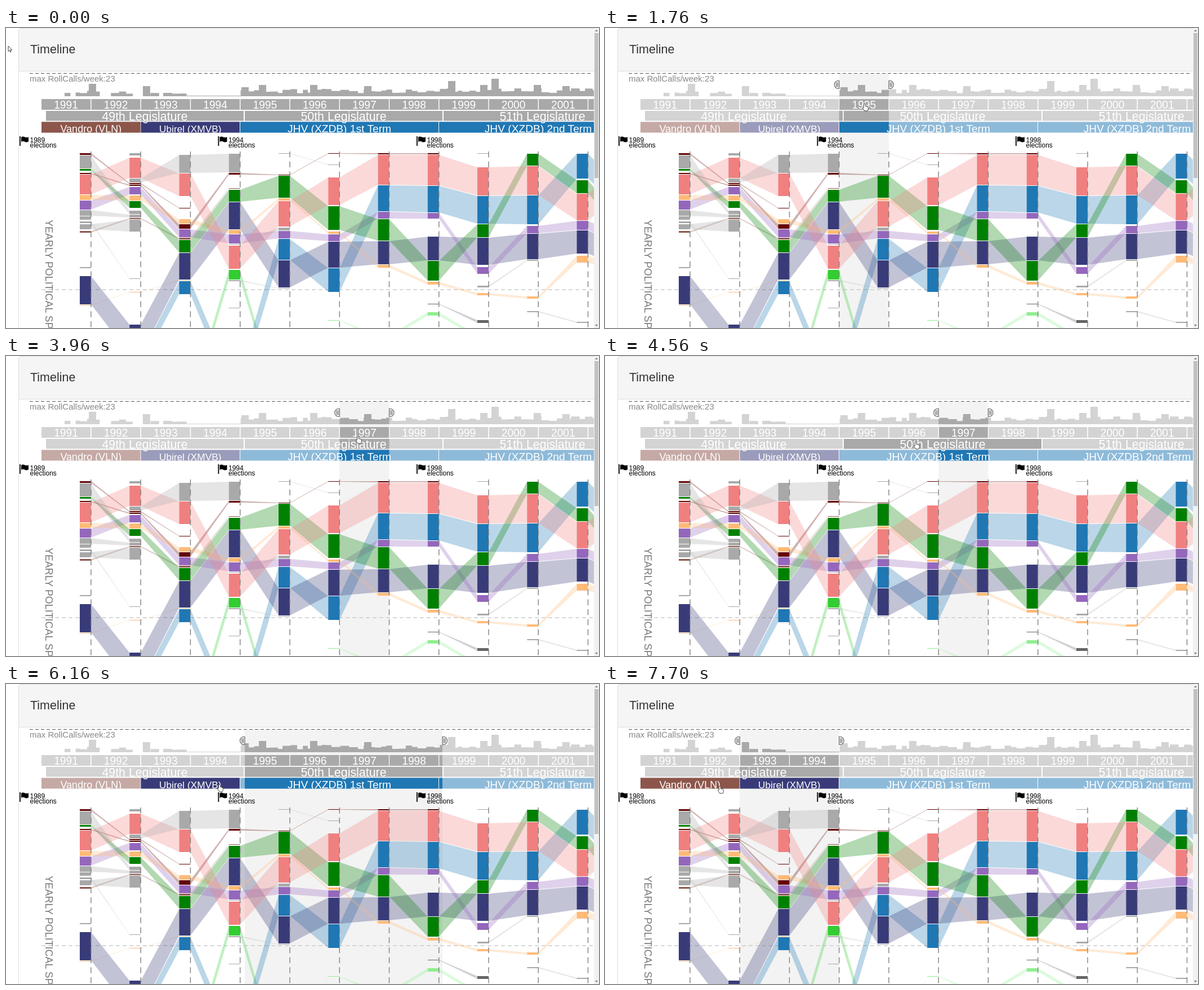
Write an HTML page that moves like this. It is 1053 by 532 pixels and loops after 8000 ms.

```html
<!DOCTYPE html>
<html lang="en">
<head>
<meta charset="utf-8">
<title>Timeline</title>
<style>
  html, body { margin: 0; width: 100%; height: 100%; overflow: hidden; background: #fff; }
  svg { display: block; width: 1053px; height: 532px; font-family: "Liberation Sans", Arial, sans-serif; }
</style>
</head>
<body>
<svg id="stage" viewBox="0 0 1053 532">
  <defs>
    <clipPath id="panel"><rect x="22" width="1022" height="532"/></clipPath>
    <clipPath id="rows"><path d="M63 126H1044V145H63ZM63 147H1044V164.5H63ZM63 166.5H1044V185.5H63Z"/></clipPath>
    <clipPath id="brushClip"><rect id="window" y="80" height="110"/></clipPath>
  </defs>
</svg>
<script>
const LOOP = 8000;
const GRAY = '#a9a9a9', NAVY = '#393b79', BLUE = '#1f77b4', BROWN = '#8c564b';
const WINE = '#640000', ORANGE = '#ffbb78';

const stage = document.getElementById('stage');
const edge = i => 151 + 88.25 * i;

function set(node, attrs) {
  for (const k in attrs) node.setAttribute(k, attrs[k]);
}
function add(parent, tag, attrs, text) {
  const node = document.createElementNS('http://www.w3.org/2000/svg', tag);
  set(node, attrs);
  if (text) node.textContent = text;
  parent.append(node);
  return node;
}
const group = (parent, attrs = {}) => add(parent, 'g', attrs);
const rect = (parent, x, y, width, height, fill) => add(parent, 'rect', { x, y, width, height, fill });
const path = (parent, d, attrs) => add(parent, 'path', { d, ...attrs });
const label = (parent, x, y, size, fill, text, attrs = {}) =>
  add(parent, 'text', { x, y, 'font-size': size, fill, ...attrs }, text);

let seed = 23;
const random = () => (seed = (seed * 16807) % 2147483647) / 2147483647;

// Panel frame
path(stage, 'M22.5 532V6Q22.5 .5 28 .5H1044V76H22.5Z', { fill: '#f5f5f5' });
path(stage, 'M22.5 532V6Q22.5 .5 28 .5H1044M22 76.5H1044', { fill: 'none', stroke: '#ddd' });
rect(stage, 23, 77, 1021, 455, '#fff');
label(stage, 43, 45, 21.5, '#333', 'Timeline');

const chart = group(stage, { 'clip-path': 'url(#panel)' });
const band = rect(chart, 0, 81, 0, 451, '#f3f3f3');
path(chart, 'M42 80.5H1041', { stroke: '#555', 'stroke-dasharray': '6 4' });
label(chart, 42, 95, 15, '#888', 'max RollCalls/week:23');

// Weekly histogram: sparse until 1995, then steady, with a few busy spells
const block = (x, w, h) => `M${x} 121v${-h}h${w}v${h}z`;
function weeklyHistogram() {
  let d = '';
  for (let x = 97; x < 1044;) {
    const w = 7 + 9 * random(), r = random();
    const h = x > 416 ? 5 + 9 * r : x > 312 ? 1 : r < .35 ? 0 : 1 + 9 * r;
    d += block(x, w, h);
    x += w;
  }
  const peaks = [[147, 22], [243, 18], [418, 16], [449, 20], [540, 20], [636, 18],
    [785, 27], [842, 20], [862, 31], [937, 20], [988, 18]];
  return d + peaks.map(([x, h]) => block(x, 13, h)).join('');
}
const histogram = weeklyHistogram();

// Three rows of periods
const boxes = [];
const captions = group(stage, { 'clip-path': 'url(#rows)' });
function period(x0, x1, y, h, fill, text, size, base) {
  boxes.push({ x: x0, y, w: x1 - x0, h, fill });
  label(captions, (x0 + x1) / 2, base, size, '#fff', text, { 'text-anchor': 'middle' });
}
for (let i = 0; i < 12; i++)
  period(i ? edge(i - 1) + .8 : 63, edge(i) - .8, 126, 19, GRAY, String(1991 + i), 19.3, 143);
for (let i = 0; i < 3; i++)
  period(71 + 353 * i, 422 + 353 * i, 147, 17.5, GRAY, `${49 + i}th Legislature`, 21.4, 164);
const term = (x0, x1, fill, text, size) => period(x0, x1, 166.5, 19, fill, text, size, 185);
term(63, 238.6, BROWN, 'Vandro (VLN)', 18);
term(239.6, 415, NAVY, 'Ubirel (XMVB)', 17.3);
term(416, 768, BLUE, 'JHV (XZDB) 1st Term', 19.2);
term(769, 1121, BLUE, 'JHV (XZDB) 2nd Term', 19.2);

function overview(attrs) {
  const g = group(chart, attrs);
  path(g, histogram, { fill: GRAY });
  boxes.forEach(b => rect(g, b.x, b.y, b.w, b.h, b.fill));
}
overview({ opacity: .5 });
overview({ 'clip-path': 'url(#brushClip)' });
const hoverBox = rect(chart, 0, 0, 0, 0, GRAY);

// Election flags
[1989, 1994, 1998].forEach((year, i) => {
  const g = group(chart, { transform: `translate(${24 + 352.5 * i} 192)` });
  path(g, 'M.9 0V17', { stroke: '#000', 'stroke-width': 1.8 });
  path(g, 'M3 1.5Q6-.5 9 1.2T16 1.2V9.5Q12 11.5 9 9.6T3 10Z', { fill: '#000' });
  label(g, 18.5, 11, 12, '#000', String(year));
  label(g, 18.5, 20, 12, '#000', 'elections');
});

path(chart, 'M63 464H1044', { stroke: '#ccc', 'stroke-width': 1.3, 'stroke-dasharray': '7 5' });
label(chart, 0, 0, 17.9, '#777', 'YEARLY POLITICAL SPECTRUM', { transform: 'translate(70 340) rotate(90)' });

// Parties in paint order; lower-case letters are small parties, drawn gray
const parties = {
  L: '#32cd32', M: '#90ee90', R: BROWN, W: WINE, V: WINE, B: BLUE, T: ORANGE, N: NAVY,
  P: '#9467bd', O: ORANGE, G: '#008000', S: '#f08080', m: '#666',
};
// One stack per year from the top down: party letter and height, or "+" and a gap
const years = [
  'W3 a23 G3 +3 V2 S35 O9 P16 b10 c6 +2 d3 +1 e9 +2 R3 +60 f2 +13 N50 T1',
  'h4 +3 S36 g7 W2 V2 +1 P13 +1 O9 G12 +4 a6 b5 R2 e21 +82 d1 +22 T1 +56 N53 B20',
  '+3 g32 S40 +20 W1 +18 O8 V8 P14 R3 G22 N47 T1 B23 +187 L16',
  '+1 g33 V3 +23 R1 +1 G21 N48 O7 P16 i1 +1 S41 +1 L17 j2 +46 k1 +112 B30',
  'l1 +36 V1 G39 O4 S45 +1 i5 P13 B37 N48 j1 +197 L12 M8',
  'V1 +18 l1 +21 S49 +1 G42 +2 O4 P12 N46 B42 +49 M1',
  'V2 S53 B46 P12 G38 N41 O5 +119 M6',
  'V2 S54 B47 P10 +31 N42 G35 +1 O5 +33 m1 +13 M6',
  'n1 +23 S50 B49 G23 N48 +3 P12 +20 o3 +9 O4 +43 m5 +20 M6',
  '+1 G21 S51 B51 +2 P13 N45 o2 +62 O4 +21 p2',
  '+1 B44 +2 G23 S47 P16 N41 +3 O12 +104 p2',
  '+8 S60 B40 +20 G20 P14 N40 O8',
];
function stack(text) {
  const spans = {};
  let y = 222;
  for (const part of text.split(' ')) {
    const size = Number(part.slice(1));
    if (part[0] === '+') { y += size; continue; }
    spans[part[0]] = [y, y + size];
    y += size + 1;
  }
  return spans;
}
const stacks = years.map(stack);
const ribbons = group(chart), bars = group(chart);
const order = new Set([...Object.keys(parties), ...'abcdefghijklnop']);
for (const key of order) {
  const fill = parties[key] || GRAY;
  stacks.forEach((spans, i) => {
    if (!spans[key]) return;
    const [top, bottom] = spans[key], x = edge(i);
    rect(bars, x - 20, top, 20, bottom - top, fill);
    const next = stacks[i + 1] && stacks[i + 1][key];
    if (next)
      path(ribbons, `M${x} ${top}L${edge(i + 1) - 20} ${next[0]}V${next[1]}L${x} ${bottom}Z`, { fill, opacity: .3 });
  });
}

for (let i = 0; i < 11; i++)
  path(chart, `M${edge(i)} 219V532`, { stroke: '#808080', 'stroke-width': 1.4, 'stroke-dasharray': '10.5 7.2' });

// Captions sit above the coloured boxes
stage.append(captions);

// Brush handles
function grip() {
  const g = group(stage);
  path(g, 'M0-7H-2A6.5 7 0 0 0-2 7H0Z', { fill: '#eee', stroke: '#666', 'stroke-width': 1.2 });
  path(g, 'M-2.6-4V4M-5-4V4', { stroke: '#666', 'stroke-width': 1.1 });
  return g;
}
const gripLeft = grip(), gripRight = grip();

// Page scrollbar
rect(stage, 1044, 0, 9, 532, '#f1f1f1');
rect(stage, 1045, 9, 7, 257, '#c1c1c1');
path(stage, 'M1046 6L1048.5 3L1051 6ZM1046 526L1048.5 529L1051 526Z', { fill: '#777' });

// Pointer
const ink = { fill: '#fff', stroke: '#333', 'stroke-width': .9 };
const arrow = path(stage, 'M0 0V9.5L2.3 7.4L3.8 10.8L5.2 10.2L3.7 6.8H6.7Z', ink);
const hand = path(stage,
  'M-1.5 7V.8Q0-1 1.3 .8V4.5L5 5.4Q6.3 5.8 6.3 7.2V9.5Q6.3 11.5 5 13H0L-3.4 8.2Q-3.2 6.2-1.5 7Z', ink);

// Each move: start, end, number of steps, points passed
const moves = [
  [500, 500, 1, [[4, 32], [294, 39]]],
  [900, 1430, 8, [[294, 39], [350, 62], [461, 134]]],
  [1830, 1900, 2, [[461, 134], [470, 136]]],
  [2160, 2500, 6, [[470, 136], [505, 144], [543, 137]]],
  [3180, 3500, 5, [[543, 137], [625, 142]]],
  [4160, 4560, 7, [[625, 142], [590, 151], [552, 152]]],
  [5700, 6160, 8, [[552, 152], [398, 158], [379, 178]]],
  [7230, 7700, 8, [[379, 178], [204, 181]]],
];
const brushes = [
  [1760, edge(3), edge(4)], [3100, edge(4), edge(5)], [3960, edge(5), edge(6)],
  [5230, 424, 775], [7160, edge(1), edge(3)],
];
const latest = (list, t) => list.filter(item => t >= item[0]).pop();

function along(points, p) {
  const s = p * (points.length - 1), i = Math.min(Math.floor(s), points.length - 2);
  return points[i].map((v, k) => v + (points[i + 1][k] - v) * (s - i));
}
function pointerAt(t) {
  const move = latest(moves, t);
  if (!move) return [4, 32];
  const [t0, t1, n, points] = move;
  const step = t >= t1 ? n : Math.floor((t - t0) / (t1 - t0) * (n - 1)) + 1;
  return along(points, step / n);
}
const show = (node, on) => { node.style.display = on ? '' : 'none'; };

function draw(t) {
  const [x, y] = pointerAt(t);
  const over = boxes.find(b => x >= b.x && x <= b.x + b.w && y >= b.y && y <= b.y + b.h);
  const brush = latest(brushes, t);
  const [, x0, x1] = brush || [0, 0, 1053];

  set(document.getElementById('window'), { x: x0, width: x1 - x0 });
  set(band, { x: x0, width: x1 - x0 });
  set(gripLeft, { transform: `translate(${x0} 100.5)` });
  set(gripRight, { transform: `translate(${x1} 100.5) scale(-1 1)` });
  [band, gripLeft, gripRight].forEach(node => show(node, brush));

  if (over) set(hoverBox, { x: over.x, y: over.y, width: over.w, height: over.h, fill: over.fill });
  show(hoverBox, over);

  for (const node of [arrow, hand]) set(node, { transform: `translate(${x} ${y})` });
  show(arrow, !over);
  show(hand, over);
}

const begin = performance.now();
function tick() {
  draw((performance.now() - begin) % LOOP);
  requestAnimationFrame(tick);
}
draw(0);
requestAnimationFrame(tick);
</script>
</body>
</html>
```
